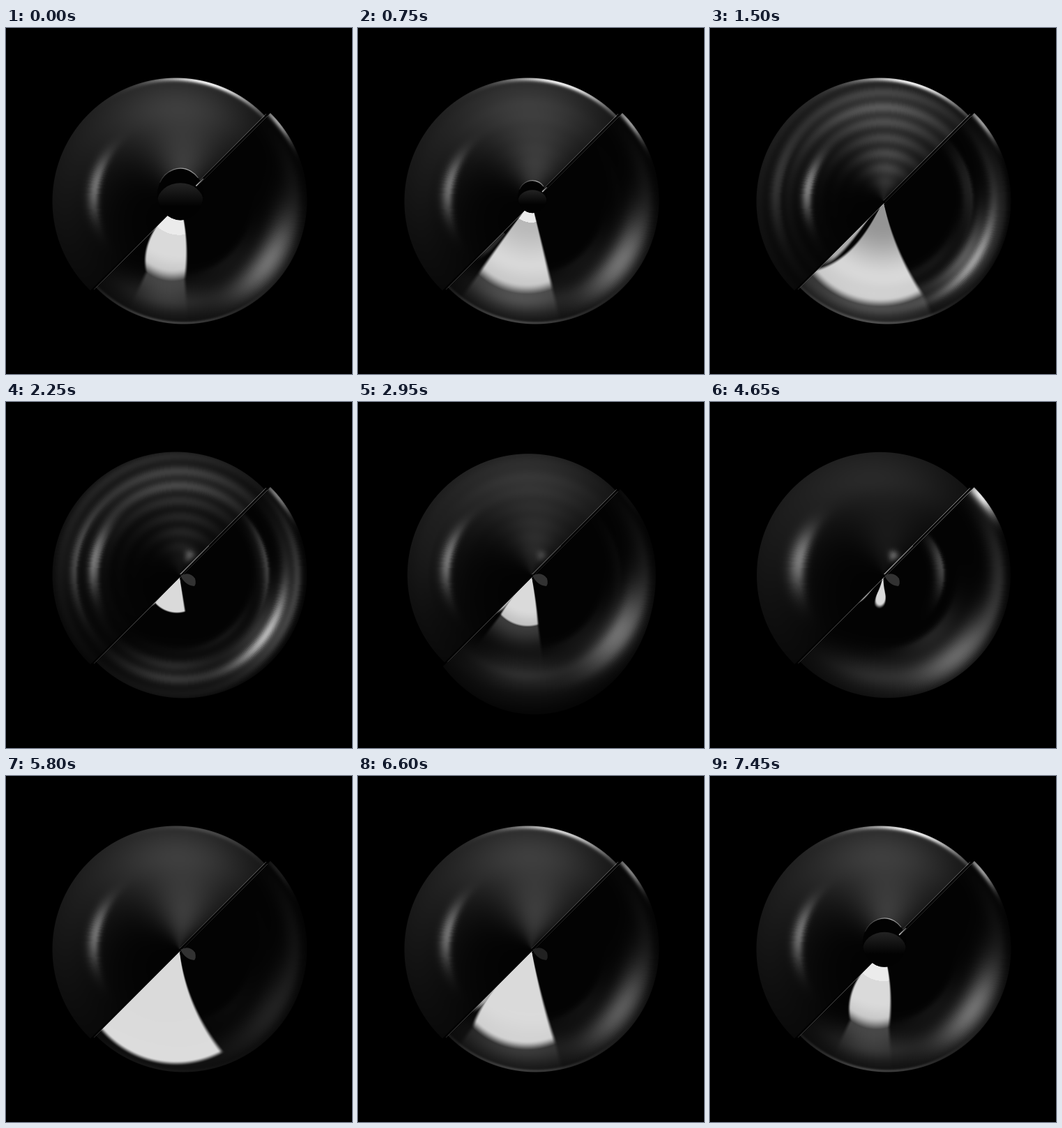
An HTML page with a canvas for the animation above (7500 ms loop, 496 px wide and 496 px high).

```html
<!DOCTYPE html>
<html>
<head>
<meta charset="utf-8">
<style>
html, body { margin: 0; width: 100%; height: 100%; overflow: hidden; background: #000; }
canvas { display: block; width: 496px; height: 496px; }
</style>
</head>
<body>
<canvas id="stage" width="496" height="496"></canvas>
<script>
const SIZE = 496, LOOP = 7500, STEP = 50, MID = 248, CUT = 498;
const ctx = document.getElementById('stage').getContext('2d');
const image = ctx.createImageData(SIZE, SIZE);

const clamp = v => v < 0 ? 0 : v > 1 ? 1 : v;
const ease = v => { v = clamp(v); return v * v * (3 - 2 * v); };
const mix = (a, b, f) => a + (b - a) * f;
const gauss = (d, w) => Math.exp(-0.5 * (d / w) * (d / w));
const turn = d => ((d + 900) % 360) - 180;
const edge = (d, w) => ease(0.5 + d / (2 * w));
// Swell around one moment of the loop
const pulse = (t, at, w) => gauss((t - at + LOOP * 1.5) % LOOP - LOOP / 2, w);

// The bright sector: outer radius, and side angles from the centre outward
const poses = [
  { t: 0, front: 112, soft: 14, right: [74, 86], left: [136, 115], tail: 60 },
  { t: 1500, front: 148, soft: 9, right: [78, 67], left: [118, 137], tail: 45, core: 0.68 },
  { t: 2250, front: 54, soft: 1.5, right: [81, 81], left: [132, 132] },
  { t: 3700, front: 96, soft: 4, right: [77, 84], left: [133, 123], tail: 120 },
  { t: 4650, front: 45, soft: 4, right: [92, 78], left: [104, 118], round: 0.4 },
  { t: 5800, front: 164, soft: 4, right: [84, 67], left: [137, 137] }
].map(p => ({ tail: 0, core: 1, round: 0.03, ...p }));

function sectorAt(t) {
  const i = poses.findLastIndex(p => p.t <= t), a = poses[i];
  const b = poses[i + 1] || { ...poses[0], t: LOOP };
  const f = ease((t - a.t) / (b.t - a.t));
  const s = {};
  for (const k in a) {
    s[k] = Array.isArray(a[k]) ? a[k].map((v, n) => mix(v, b[k][n], f)) : mix(a[k], b[k], f);
  }
  return s;
}

// All moods of the surface, from the time alone
function stateAt(t) {
  const s = sectorAt(t);
  s.t = t;
  s.ripple = pulse(t, 1950, 450);
  s.lull = pulse(t, 4650, 380);
  s.calm = pulse(t, 5800, 500);
  s.squeeze = pulse(t, 3650, 350);
  s.R = 177 - 24 * s.squeeze;
  s.stretch = 1 + 0.2 * pulse(t, 2850, 130);
  s.rim = Math.max(1 - ease((t - 1500) / 700), ease((t - 5400) / 1600));
  s.tip = Math.max(0.65 * s.rim, s.lull, 0.5 * pulse(t, 2250, 300));
  s.open = ease((s.front - 42) / 60);
  s.bead = ease((t - 1700) / 500) * (1 - ease((t - 6400) / 500));
  const age = (t - 6950 + LOOP) % LOOP;
  s.hole = age < 1600 ? 42 * Math.sin(Math.PI * age / 1600) : 0;
  return s;
}

// A soft reflection lying on a ring, strongest at one angle
function light(r, wi, wo, angle, spread, amp, scale = 1) {
  const ring = new Float32Array(300), arc = new Float32Array(721);
  for (let k = 0; k < 300; k++) {
    const d = k / scale - r;
    ring[k] = amp * gauss(d, d < 0 ? wi : wo);
  }
  for (let k = 0; k <= 720; k++) arc[k] = gauss(turn(k / 2 - angle), spread);
  return { ring, arc };
}
// A reflection measured inward from the disc edge
const rimLight = (depth, angle, spread, amp) => light(1.5, 2, depth, angle, spread, amp, 10);

function lights(s) {
  const { ripple, lull, calm, open, rim, tip, R } = s;
  const size = R / 177, crescent = 122 - 15 * pulse(s.t, 1500, 400);
  return {
    upper: [
      light(165, 45, 40, 235, 60, 26 - 6 * ripple),
      light(95, 65, 60, 274, 32, 16 + 28 * open),
      light(40, 25, 30, 278, 25, 8 + 14 * open),
      light(135, 16, 18, 268, 35, 6 + 24 * ripple),
      light(crescent, 5 - 2 * ripple + 2 * lull, 7 + 3 * lull, 191, 15, 92 + 22 * ripple + 12 * lull),
      light(150, 3, 8, 190, 18, 45 * ripple),
      light(32, 6, 5, 297, 9, 75 * (1 - open))
    ],
    lower: [
      light(153 * size - 3 * ripple, 15 - 4 * ripple, 15 - 8 * ripple, 34 + 14 * lull, 18,
        100 * (1 - 0.8 * calm) * size + 30 * ripple - 10 * lull),
      light(125 - 41 * lull, 7, 3, -10, 19, 60 * ripple + 65 * lull),
      light(166 * size, 10, 7, 8, 30, 12 + 45 * ripple + 25 * lull),
      light(110, 5, 12, 50, 20, 14 + 16 * lull - 8 * calm),
      light(142, 18, 12, 95, 20, 32 * (1 - calm)),
      light(162, 20, 20, 95, 40, 14)
    ],
    upperRim: [rimLight(2.6, 285, 17, 200 * rim)],
    lowerRim: [
      rimLight(1.6, 95, 25, 48 * rim),
      rimLight(3 + 3 * lull, -39, 7, 230 * tip)
    ]
  };
}

function sum(list, k, a) {
  let v = 0;
  for (const b of list) v += b.ring[k] * b.arc[a];
  return v;
}

function sector(s, r, a) {
  const p = r / s.front, q = clamp(p);
  const right = mix(s.right[0], s.right[1], q), left = mix(s.left[0], s.left[1], q * q);
  const soft = 1.5 + 25 / (r + 4);
  const side = edge(a - right, soft) * edge(left - a, soft);
  if (side <= 0) return 0;
  const u = (2 * a - right - left) / (left - right);
  const over = r - s.front * (1 - s.round * u * u);
  const glow = r < 1.3 * s.hole ? 235 : 218 * mix(s.core, 1, ease(p * 1.8 - 0.4)) - 25 * ease(p * 3 - 2) * clamp(s.tail / 50);
  const tail = over > 0 ? s.tail * gauss(over, 20) : 0;
  return side * Math.max(tail, glow * edge(-over, s.soft));
}

// Narrow reflection hugging the cut
function leaf(s, r, a) {
  const p = r / (25 + 0.75 * s.front);
  if (p > 1 || s.hole > 1 && r < 60) return 0;
  return 170 * edge(a - 136.5 + 8 * Math.sqrt(Math.sin(Math.PI * p)), 2) * ease((1 - p) * 4) * (1 - s.rim * clamp(s.hole / 30));
}

// Polar position of each pixel never changes
const polR = new Float32Array(SIZE * SIZE), polA = new Float32Array(SIZE * SIZE);
for (let y = 0, i = 0; y < SIZE; y++) for (let x = 0; x < SIZE; x++, i++) {
  polR[i] = Math.hypot(x - MID, y - MID);
  polA[i] = (Math.atan2(y - MID, x - MID) * 180 / Math.PI + 360) % 360;
}

function shade(s) {
  const { upper, lower, upperRim, lowerRim } = lights(s);
  const q = s.squeeze, px = image.data;
  const ux = 243 + 8 * q, uy = 248 - 4 * q, lx = 254 - 10 * q, ly = 247 + 5 * q;
  const wave = new Float32Array(300).map((_, r) =>
    1 + 0.35 * s.ripple * ease(r / 80) * Math.cos(2 * Math.PI * (r - 128 - (s.t - 2250) * 0.02) / 22));
  for (let y = 0, i = 0; y < SIZE; y++) for (let x = 0; x < SIZE; x++, i++) {
    let v = 0;
    const r = polR[i];
    if (r < 230) {
      const top = x + y < CUT;
      let dy = y - (top ? uy : ly);
      if (!top && dy > 0) dy /= s.stretch;
      const gap = s.R - Math.hypot(x - (top ? ux : lx), dy);
      if (gap > -0.5) {
        const a = polA[i], ai = Math.round(a * 2), ri = Math.round(r);
        v = 3 + sum(top ? upper : lower, ri, ai) * wave[ri];
        if (gap < 29) v += sum(top ? upperRim : lowerRim, Math.max(0, Math.round(gap * 10)), ai);
        if (!top && a > 50 && a < 150) {
          const glow = Math.max(sector(s, r, a), leaf(s, r, a));
          v = glow + v * (1 - glow / 255);
        }
        v *= clamp(gap + 0.5) * clamp((Math.abs(x + y - CUT) - 1) / 1.5);
      }
    }
    const o = i * 4;
    px[o] = px[o + 1] = px[o + 2] = v;
    px[o + 3] = 255;
  }
  ctx.putImageData(image, 0, 0);
}

function glint(x0, y0, x1, y1, a0, a1, width = 1) {
  const g = ctx.createLinearGradient(x0, y0, x1, y1);
  g.addColorStop(0, `rgba(225,225,225,${a0})`);
  g.addColorStop(1, `rgba(225,225,225,${a1})`);
  ctx.strokeStyle = g;
  ctx.lineWidth = width;
  ctx.beginPath();
  ctx.moveTo(x0, y0);
  ctx.lineTo(x1, y1);
  ctx.stroke();
}

function drawCut(s) {
  const d = s.R * 0.7, shine = 0.25 + 0.3 * s.lull + 0.1 * s.ripple;
  glint(249, 247, 249 + d, 247 - d, shine * 0.6, shine + 0.1);
  glint(251, 250, 251 + d, 250 - d, shine * 0.4, shine);
  glint(250, 251, 250 - d, 251 + d, 0.5, 0.2);
  glint(250, 247, 291, 206, 0.6 * (1 - s.open), 0.3 * (1 - s.open), 1.5);
}

function drawBead(s) {
  ctx.fillStyle = `rgba(50,50,50,${s.bead})`;
  ctx.beginPath();
  ctx.moveTo(250, 249);
  ctx.quadraticCurveTo(263, 242, 271, 253);
  ctx.quadraticCurveTo(273, 261, 270, 264);
  ctx.quadraticCurveTo(257, 263, 250, 249);
  ctx.fill();
}

function oval(x, y, rx, ry, start = 0, end = 2) {
  ctx.beginPath();
  ctx.ellipse(x, y, rx, ry, 0, start * Math.PI, end * Math.PI);
}

function drawHole(r) {
  if (r < 1) return;
  const x = 250, y = 248 - r * 0.26, rx = r * 0.89, ball = r * 0.72;
  ctx.fillStyle = '#020202';
  oval(x, y, rx, r);
  ctx.fill();
  ctx.save();
  ctx.clip();
  const g = ctx.createLinearGradient(0, 248 - r * 0.7, 0, 248 + r * 0.2);
  g.addColorStop(0, '#242424');
  g.addColorStop(1, '#020202');
  ctx.fillStyle = g;
  oval(x, 249, rx, ball);
  ctx.fill();
  ctx.restore();
  const rim = ctx.createLinearGradient(x - rx, 0, x + rx, 0);
  rim.addColorStop(0, 'rgba(210,210,210,.05)');
  rim.addColorStop(0.65, 'rgba(210,210,210,.8)');
  rim.addColorStop(1, 'rgba(210,210,210,.3)');
  ctx.strokeStyle = rim;
  ctx.lineWidth = 1.2;
  oval(x, y, rx, r, 1.15, 1.78);
  ctx.stroke();
  glint(x + rx * 0.68, 249 - rx * 0.68, x + rx, 249 - rx, 0.9, 0.4, 1.5);
}

function frame(ms) {
  const s = stateAt(Math.floor((ms % LOOP) / STEP) * STEP);
  shade(s);
  drawCut(s);
  drawBead(s);
  drawHole(s.hole);
}

let start = null, last = -1;
function tick(time) {
  if (start === null) start = time;
  const n = Math.floor((time - start) / STEP);
  if (n !== last) {
    last = n;
    frame(time - start);
  }
  requestAnimationFrame(tick);
}
frame(0);
requestAnimationFrame(tick);
</script>
</body>
</html>
```
